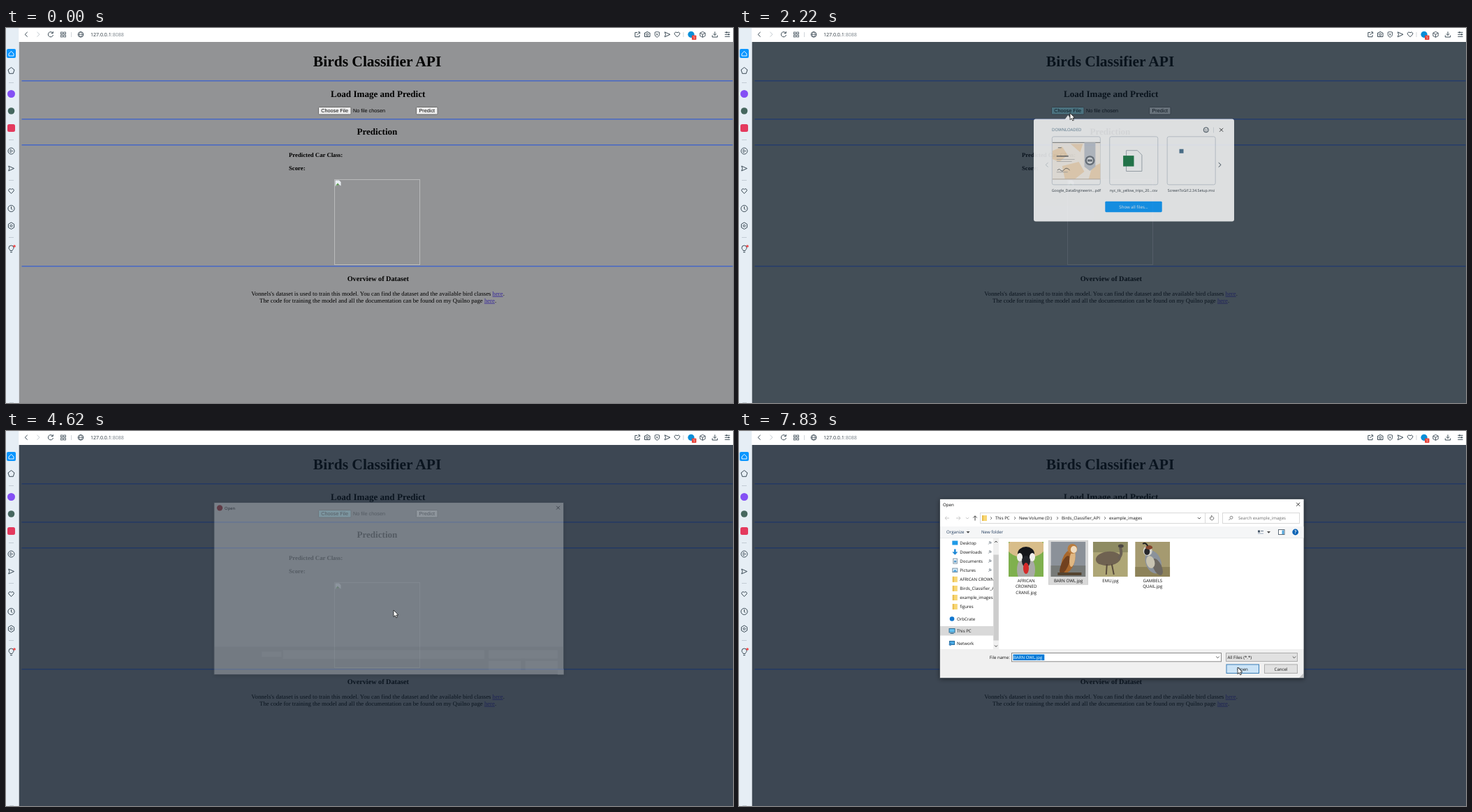
Animation, 1041 px wide and 538 px high, one loop 8000 ms. Source, as an HTML page:

```html
<!DOCTYPE html>
<html lang="en">
<head>
<meta charset="utf-8">
<title>Birds Classifier API</title>
<style>
html, body { margin: 0; width: 100%; height: 100%; overflow: hidden; background: #fff; }
svg { display: block; width: 1041px; height: 538px; }
text { font-family: "Open Sans", "Noto Sans", sans-serif; text-rendering: geometricPrecision; white-space: pre; }
.serif { font-family: "Liberation Serif", "Times New Roman", serif; }
.arial { font-family: "Liberation Sans", Arial, sans-serif; }
.b { font-weight: 700; }
.m { text-anchor: middle; }
.e { text-anchor: end; }
</style>
</head>
<body>
<svg id="stage" viewBox="0 0 1041 538" xmlns="http://www.w3.org/2000/svg"></svg>
<script>
const LOOP = 8000;
const INK = '#3b4a55';

// Drawing helpers
const rect = (x, y, w, h, fill, more = '') =>
  `<rect x="${x}" y="${y}" width="${w}" height="${h}" fill="${fill}" ${more}/>`;
const box = (x, y, w, h, fill, line, more = '') =>
  rect(x + .5, y + .5, w - 1, h - 1, fill, `stroke="${line}" ${more}`);
const disc = (x, y, r, fill, more = '') => `<circle cx="${x}" cy="${y}" r="${r}" fill="${fill}" ${more}/>`;
const ring = (x, y, r, line = INK) => disc(x, y, r, 'none', `stroke="${line}"`);
const oval = (x, y, rx, ry, fill, turn = 0) =>
  `<ellipse rx="${rx}" ry="${ry}" fill="${fill}" transform="translate(${x} ${y}) rotate(${turn})"/>`;
const line = (d, color = INK, more = '') => `<path d="${d}" fill="none" stroke="${color}" ${more}/>`;
const fill = (d, color) => `<path d="${d}" fill="${color}"/>`;
const text = (x, y, s, size, cls = '', color = '#000') =>
  `<text x="${x}" y="${y}" font-size="${size}" class="${cls}" fill="${color}">${s}</text>`;
const group = (id, body, more = '') => `<g id="${id}" ${more}>${body}</g>`;
const at = (x, y, body) => `<g transform="translate(${x} ${y})">${body}</g>`;
const chevron = (x, y, dx, dy, color = INK) =>
  line(dx ? `M${x - dx / 2} ${y - 3.2}l${dx} 3.2l${-dx} 3.2` : `M${x - 2.2} ${y - dy / 2}l2.2 ${dy}l2.2 ${-dy}`, color);

// Icons around the origin
const heart = line('M0 3.5L-3.4 0A2 2 0 0 1 0-2.4A2 2 0 0 1 3.4 0Z');
const plane = line('M-3.8-3.5L4 0L-3.8 3.5L-2.5 0Z');
const cross = line('M-2.5-2.5l5 5m0-5l-5 5', '#222', 'stroke-width=".9"');
const folder = rect(-3.5, -4, 7, 8, '#f8d775') + rect(-3.5, -4, 2, 8, '#e9bd4c');

function browser() {
  const rules = [78, 160, 218, 300].map(y => rect(4, y, 7, .8, '#b9c4cc')).join('');
  const side = rect(0, 0, 18.5, 538, '#e6eef5') + rules +
    rect(1, 30, 13, 13, '#0a96ff', 'rx="2"') + line('M4 37L7.5 33.3L11 37V40H4Z', '#fff', 'stroke-width=".9"') +
    line('M7.5 56.5L12 60L10.3 65.3H4.7L3 60Z') +
    disc(7.5, 94.5, 5.5, '#8450f5') + disc(7.5, 119, 4.8, '#46675f') +
    rect(2, 138, 11, 11, '#e43a5e', 'rx="2.5"') +
    ring(7.5, 176.5, 4.5) + line('M6 174.3L9.6 176.5L6 178.7Z', INK, 'stroke-width=".8"') +
    at(7.5, 201.5, plane) + at(7.5, 234, heart) +
    ring(7.5, 259, 4.6) + line('M7.5 256V259.5L9.3 260.6') +
    line('M7.5 279L11.6 281.4V286.2L7.5 288.6L3.4 286.2V281.4Z') + ring(7.5, 283.8, 1.5) +
    line('M6 319.5C6 318 4 317.5 4 315.5A3.4 3.4 0 0 1 11 315.5C11 317.5 9 318 9 319.5ZM6 321.7H9') +
    disc(12, 313, 1.8, '#ee4b4b') + rect(5, 537, 6, 1, '#c2ccd3');
  const grid = [[78, 6], [82.3, 6], [78, 10.2], [82.3, 10.2]]
    .map(([x, y]) => rect(x + .5, y, 2.7, 2.7, 'none', `stroke="${INK}" stroke-width=".8"`)).join('');
  const bar = rect(18.5, 0, 1023, 20, '#fff') +
    line('M30.7 5.8L27.2 9.2L30.7 12.6') + line('M44.5 5.8L48 9.2L44.5 12.6', '#c3cad0') +
    line('M66.8 7A3.6 3.6 0 1 0 67.5 10M67.3 5V7.6H64.7') + grid +
    rect(93, 6, 1, 7, '#d0d6da') + ring(107, 9.3, 3.8) + line('M103 9.3H111M107 5.5C104.5 8 104.5 10.6 107 13.1C109.5 10.6 109.5 8 107 5.5', INK, 'stroke-width=".7"') +
    text(121, 12, '127.0.0.1<tspan fill="#7b858c">:8088</tspan>', 7.05, '', '#26323a') +
    line('M904 6.4H900.8V12.7H907V10M903.3 10.3L907.3 6.3M905 5.8H907.6V8.4') +
    line('M914.5 7H916.2L917 5.7H919.5L920.2 7H922V12.5H914.5Z') + ring(918.2, 9.6, 1.5) +
    line('M929.2 6L932.3 5.5L935.5 6V9.7C935.5 11.5 934 12.5 932.3 13.2C930.6 12.5 929.2 11.5 929.2 9.7ZM931 8l2.6 2.6m0-2.6l-2.6 2.6', INK, 'stroke-width=".9"') +
    at(947, 9.3, plane) + at(961, 9.3, heart) + rect(969.5, 6, 1, 7, '#d0d6da') +
    disc(981, 9.3, 4.6, '#0a8fd8') + rect(982, 10.5, 6.5, 6.5, '#e8453c', 'rx="1"') + text(985.2, 16, '1', 5.5, 'm', '#fff') +
    line('M997.5 5.3L1001.2 7.2V11.4L997.5 13.3L993.8 11.4V7.2ZM993.8 7.2L997.5 9.2L1001.2 7.2M997.5 9.2V13.3', INK, 'stroke-width=".9"') +
    line('M1015 5.3V10.3M1012.8 8.3L1015 10.5L1017.2 8.3M1011.3 10.5V13H1018.7V10.5') +
    line('M1029.3 6.3H1036.5M1029.3 9.3H1036.5M1029.3 12.3H1036.5') + rect(1031, 5.3, 1.5, 2, INK) + rect(1034, 8.3, 1.5, 2, INK);
  return side + bar;
}

function page() {
  const here = '<tspan fill="#3a2c9a" text-decoration="underline">here</tspan>.';
  return rect(18.5, 20, 1023, 518, '#929395') +
    [75, 130, 167, 341].map(y => rect(22.5, y + .3, 1018, 1.1, '#2c58d8')).join('') +
    text(531.6, 55, 'Birds Classifier API', 21.5, 'serif b m') +
    text(532.7, 99.4, 'Load Image and Predict', 13.09, 'serif b m') +
    box(447, 113, 47.5, 11.5, '#efefef', '#6b6b6b', 'id="choose" rx="1.2"') +
    text(470.6, 121.3, 'Choose File', 7.27, 'arial m') +
    text(497, 121.3, 'No file chosen', 7.27, 'arial') +
    box(587, 113, 31.5, 11.5, '#efefef', '#6b6b6b', 'rx="1.2"') +
    text(602.8, 121.3, 'Predict', 7.27, 'arial m') +
    text(531.4, 153.4, 'Prediction', 13.09, 'serif b m') +
    text(405, 185.2, 'Predicted Car Class:', 8.73, 'serif b') +
    text(405, 203.8, 'Score:', 8.73, 'serif b') +
    box(470, 217, 123, 123, 'none', '#b9babb') +
    fill('M471.5 218.5H477L479.5 221V226.5L476 224L471.5 227Z', '#e8edf2') + fill('M472 226L475 222.5L477 225Z', '#5a9a4a') +
    text(532.8, 363, 'Overview of Dataset', 10.2, 'serif b m') +
    text(532.6, 383.8, `Vonnels's dataset is used to train this model. You can find the dataset and the available bird classes ${here}`, 8.73, 'serif m') +
    text(532.6, 393.7, `The code for training the model and all the documentation can be found on my Quilno page ${here}`, 8.73, 'serif m');
}

function picker() {
  const card = x => box(x, 155, 70.5, 70.5, '#fff', '#cbd2d8', 'rx="2.5"');
  const label = (x, s) => text(x, 235.2, s, 5.35, 'm', '#2a343b');
  const paper = rect(448, 163.5, 69, 54, '#fdf6ec') + rect(448, 163.5, 69, 1.2, '#8e8e8e') +
    fill('M448 176L462 170L470 182L458 192L448 188ZM462 198L486 192L494 206L480 217H466ZM505 200L517 194V217H500ZM474 166H492L488 178Z', '#f9dfbd') +
    rect(448, 216.3, 69, 1.2, '#c9c0b2') +
    fill('M494 164H510V199L502 205L494 199Z', '#c5cad2') + disc(502, 190, 7, '#6d747d') + disc(502, 190, 4.6, '#e4e7ea') + rect(498.5, 188.5, 7, 3, '#6d747d') +
    rect(456, 171, 5, 1, '#777') + rect(454, 183, 17, 1.5, '#666') + rect(454, 188, 26, .7, '#aaa') + rect(454, 191, 22, .7, '#aaa') +
    line('M455 204q3-3 5 0t5-1t8 1', '#444', 'stroke-width=".8"') + rect(454, 206.5, 16, .7, '#999');
  return rect(421, 130, 289, 148, '#fff', 'rx="3"') + fill('M466 130.5L470.5 124.5L475 130.5Z', '#fff') +
    text(447.3, 148, 'DOWNLOADED', 6, '', '#5a7c90') +
    ring(669.5, 145.8, 3.6) + disc(668.2, 145, .6, INK) + disc(670.8, 145, .6, INK) + line('M667.5 146.8q2 1.8 4 0', INK, 'stroke-width=".7"') +
    rect(680, 142, .8, 8, '#d6dce0') + at(691.5, 145.8, cross) +
    card(447) + card(530) + card(613) + paper +
    line('M554.5 175.5H570.5L577 182V205.5H554.5Z', '#9aa5ac', 'stroke-width=".9"') + rect(550, 183, 15.5, 15.5, '#1b7a45') +
    rect(631, 173.5, 6, 6, '#4a7390') +
    chevron(440, 196.3, -3.5, 0, '#ccd2d6') + chevron(689.3, 196.3, 3.5, 0) +
    label(482.3, 'Google_DataEngineerin...pdf') + label(565, 'nyc_tlc_yellow_trips_20...csv') + label(648, 'ScreenToGif.2.34.Setup.msi') +
    rect(524, 249, 82, 15.7, '#0a9bff', 'id="showAll" rx="1.5"') + text(565, 259, 'Show all files...', 6.15, 'm', '#fff');
}

// Four bird thumbnails, each 50 by 50
const birds = [
  rect(0, 0, 50, 50, '#7fb04e') + oval(25, 8, 27, 15, '#d8bd8a') + oval(25, 40, 13, 20, '#a9aaa6') +
    oval(25, 17, 12, 10, '#15161a') + oval(16, 22, 4, 6, '#f1efec') + oval(34, 22, 4, 6, '#f1efec') +
    oval(25, 28, 6, 8, '#22242a') + oval(25, 38, 4, 8, '#d42a2a'),
  rect(0, 0, 50, 50, '#8b9199') + rect(0, 34, 50, 16, '#777a78') + oval(25, 28, 9, 17, '#a8672c', 18) +
    oval(20, 33, 5, 14, '#71411f', 24) + oval(31, 24, 4, 12, '#dfb783', 8) + oval(31, 10, 7, 7, '#b97c3d') + oval(33, 11, 4.5, 5, '#f0dcc0') +
    rect(10, 44, 34, 4, '#54432f'),
  rect(0, 0, 50, 50, '#aea676') + rect(0, 0, 50, 15, '#8e8b62') + oval(22, 24, 18, 10, '#6f6251', -6) +
    line('M36 24Q43 19 39 8', '#6a6055', 'stroke-width="4"') + oval(40, 6, 4, 2.5, '#4c4743') +
    line('M20 32L19 47M27 32L30 47', '#5a4d3e', 'stroke-width="2"'),
  rect(0, 0, 50, 50, '#a59a70') + rect(0, 36, 50, 14, '#8d8259') + oval(26, 29, 11, 17, '#8b929b', -20) +
    oval(32, 36, 6, 13, '#6d6861', -25) + oval(18, 13, 6.5, 7, '#d5d3cb') + oval(17, 14, 4, 5, '#26272b') +
    oval(20, 8, 5, 3, '#85452d') + line('M18 6Q15 0 11 3', '#222', 'stroke-width="2"') + oval(22, 29, 6, 9, '#c8c3b1', -15)
];

function dialogBlank() {
  const white = (x, y, w, h) => rect(x, y, w, h, '#fff');
  return white(358.5, 320.3, 29.5, 8) + white(390.3, 318, 300.5, 13) + white(697, 318, 103, 12.5) +
    white(697, 334, 48, 14) + white(752, 334, 48, 14) + white(800, 346, 9, 8.5);
}

function dialogBody() {
  const small = (x, y, s, cls, color = '#111') => text(x, y + 2.3, s, 6.1, cls, color);
  const crumbs = [[367, 'This PC'], [401, 'New Volume (D:)'], [462, 'Birds_Classifier_API'], [530, 'example_images']];
  const places = ['Desktop', 'Downloads', 'Documents', 'Pictures', 'AFRICAN CROWNED', 'Birds_Classifier_API', 'example_images', 'figures'];
  const placeIcon = [
    rect(-4, -3, 8, 6, '#1f9be8'),
    fill('M-1.2-4H1.2V0H4L0 4.2L-4 0H-1.2Z', '#1b87d6'),
    box(-3, -4, 6.5, 8, '#fff', '#8195a5') + rect(-1.5, -1, 3.5, 3, '#5e9cc9'),
    box(-4, -3.2, 8, 6.5, '#d9efff', '#7c94a5') + fill('M-3 2L0-1L3 2Z', '#3f9bd8')
  ];
  const pin = line('M-1.8 2L0 .2M-.9-1.5L1.6 1M.2-2.4L2.4-.2L.6 .4L-.6-.8Z', '#7c8790', 'stroke-width=".9"');
  const list = places.map((s, i) => {
    const y = 160.5 + i * 13.08;
    return at(309.3, y, placeIcon[i] || folder) + small(316.3, y, s) + (i < 4 ? at(359, y, pin) : '');
  }).join('');
  const names = [['AFRICAN', 'CROWNED', 'CRANE.jpg'], ['BARN OWL.jpg'], ['EMU.jpg'], ['GAMBELS', 'QUAIL.jpg']];
  const files = names.map((rows, i) => {
    const x = 386 + i * 60.4;
    return `<svg x="${x}" y="159" width="50" height="50">${birds[i]}</svg>` +
      rows.map((s, n) => small(x + 25.2, 215 + n * 8.1, s, 'm')).join('');
  }).join('');
  const button = (id, x, y, w, h) => box(x, y, w, h, '#e1e1e1', '#adadad', `id="${id}"`);
  return line('M301 125H295M297.5 122.5L295 125L297.5 127.5M311 125H317M314.5 122.5L317 125L314.5 127.5', '#c8c8c8') +
    chevron(327, 125, 0, 1.8, '#c8c8c8') + line('M338 128.5V121.8M335.3 124.5L338 121.8L340.7 124.5', '#444') +
    box(345, 117, 323, 16, '#fff', '#d9d9d9') + box(667, 117, 20, 16, '#fff', '#d9d9d9') + box(692, 117, 111, 16, '#fff', '#d9d9d9') +
    at(351.5, 125, folder) +
    crumbs.map(([x, s]) => line(`M${x - 7} 123l2 2l-2 2`, '#555', 'stroke-width=".8"') + small(x, 125, s)).join('') +
    chevron(659, 125, 0, 2.2, '#555') + line('M679 123.3A2.6 2.6 0 1 1 676.5 122.6M676 121L678 122.6L676.3 124', '#555', 'stroke-width=".9"') +
    ring(705, 124.2, 2, '#888') + line('M703.5 125.8L701.3 128', '#888') + small(715, 125, 'Search example_images', '', '#6d6d6d') +
    rect(288, 137, 520.5, 16, '#f5f6f7') + rect(288, 153, 520.5, .8, '#e2e4e6') +
    small(297, 145, 'Organize', '', '#1e395b') + fill('M325.5 144H330.5L328 146.8Z', '#444') + small(347, 145, 'New folder', '', '#1e395b') +
    rect(743, 142.5, 3, 3, '#456') + rect(747, 143, 4, 1, '#678') + rect(743, 146.5, 8, 1, '#9ab') + fill('M756 144H761L758.5 146.8Z', '#444') +
    box(772, 141, 9.5, 8, '#fff', '#5d6b78') + rect(777.5, 142.5, 3, 5.5, '#56a8dd') +
    disc(796.7, 145, 4.4, '#0b63b5') + text(796.7, 147.4, '?', 6.5, 'b m', '#fff') +
    `<svg x="288" y="154" width="76" height="159" viewBox="288 154 76 159">` + rect(288, 280, 76, 13.5, '#d9d9d9') + list +
    disc(305, 269.5, 3.3, '#1177cf') + small(312, 269.5, 'OrbCrate') +
    box(300.5, 283, 9, 6.5, '#62c0f0', '#356f95') + rect(302.5, 290, 5, 1, '#356f95') + small(312, 287, 'This PC') +
    box(301, 301, 8, 6, '#4cabe5', '#246a9b') + disc(302.5, 306, 2, '#3d87bf') + small(312, 304.5, 'Network') + '</svg>' +
    rect(364, 154, 8, 159, '#f0f0f0') + rect(364.3, 177.5, 7.5, 123, '#cdcdcd') +
    line('M366 160L368 158L370 160M366 307.5L368 309.5L370 307.5', '#444') +
    group('files', box(443, 156.7, 57, 64, '#cce8ff', '#99d1ff', 'id="pick"') + files) +
    small(387.8, 324.5, 'File name:', 'e') + box(390, 318, 301, 13.3, '#fff', '#0078d7', 'id="field"') +
    rect(392.5, 320.5, 44.8, 8.5, '#0078d7', 'id="marked"') +
    group('fileName', small(393, 324.7, 'BARN OWL.jpg', '', 'currentColor')) + rect(393, 320.3, .8, 8.5, '#000', 'id="caret"') +
    chevron(685.5, 324.6, 0, 2.2, '#555') +
    button('kinds', 697, 318, 103, 13) + small(699.5, 324.5, 'All Files (*.*)') + chevron(795, 324.6, 0, 2.2, '#555') +
    button('open', 697.5, 334.5, 47.5, 13.5) + small(721, 341.2, 'Open', 'm') +
    button('cancel', 752, 334.5, 48, 13.5) + small(776, 341.2, 'Cancel', 'm') +
    fill('M808 348V354H802Z', '#c4c4c4');
}

const dialog = () => rect(287.5, 97.5, 521.5, 257, '#fff', 'filter="url(#shade)"') +
  rect(287.5, 313, 521.5, 41.5, '#f0f0f0') + rect(287.5, 97.5, 521.5, 257, 'none', 'stroke="#39434b" stroke-width=".8"') +
  disc(296, 105.5, 4.3, '#b3202b', 'id="badge"') +
  `<text id="caption" y="107.8" font-size="6.1">Open</text>` + at(800.7, 105.3, cross) +
  group('blank', dialogBlank()) + group('body', dialogBody());

const arrow = `<path d="M0 0V9.6L2.2 7.6L3.8 11L5.4 10.2L3.9 7H6.8Z" fill="#fff" stroke="#111" stroke-width=".75"/>`;

document.getElementById('stage').innerHTML =
  '<defs><filter id="shade" x="-5%" y="-5%" width="110%" height="110%"><feDropShadow dx="0" dy="1.5" stdDeviation="3" flood-opacity=".5"/></filter></defs>' +
  page() + rect(18.5, 20, 1023, 518, '#102030', 'id="veil"') + browser() +
  group('picker', picker()) + group('dialog', dialog()) +
  disc(0, 0, 6.5, '#e2e21a', 'id="click" fill-opacity=".8"') + group('cursor', arrow) +
  group('busy', line('M4 0A4 4 0 1 1 0-4', '#2f8fe0', 'stroke-width="1.3"'));

const $ = id => document.getElementById(id);
const set = (id, attrs) => Object.entries(attrs).forEach(([k, v]) => $(id).setAttribute(k, v));
const show = (id, on) => set(id, { visibility: on ? 'inherit' : 'hidden' });
const within = (t, a, b) => t >= a && t < b;

// Rows of [start, ...values], held until the next row
const held = (rows, t) => rows.reduce((now, row) => t >= row[0] ? row : now);
const veil = [[0, 0], [2150, .49], [2220, .6], [2270, .65]];
const popup = [[0, 0, 1], [2150, .39, .972], [2220, .82, .993], [2270, 1, 1], [3750, .8, .99], [3830, .42, .974], [3880, .1, .96], [3940, 0, 1]];
const opening = [[0, 0, 1], [4620, .3, .96], [4730, .8, .99], [4840, 1, 1]];

// Pointer moves: first change, last change, steps, target x, y
const moves = [
  [70, 400, 6, 938, 423], [600, 1370, 12, 474, 126], [1430, 1570, 3, 474, 122],
  [2530, 2800, 5, 547, 260], [2860, 3000, 3, 550, 262.5], [3060, 3270, 4, 555, 257],
  [4980, 5780, 12, 474, 199], [5850, 6050, 4, 476.5, 195.5],
  [6670, 7430, 12, 715, 340], [7490, 7560, 2, 714, 339]
];
function pointer(t) {
  let x = 1012, y = 552;
  for (const [a, b, n, tx, ty] of moves) {
    if (t < a) break;
    const k = Math.min(n, 1 + Math.floor((t - a) / ((b - a) / (n - 1)) + 1e-6));
    const p = k / n, e = n > 5 ? p * p * (3 - 2 * p) : p;
    x += (tx - x) * e;
    y += (ty - y) * e;
  }
  return [x, y];
}

const zoom = (id, [, alpha, s], cx, cy) => {
  set(id, { opacity: alpha, transform: `translate(${cx} ${cy}) scale(${s}) translate(${-cx} ${-cy})` });
  show(id, alpha > 0);
};

function draw(t) {
  const [x, y] = pointer(t);
  const final = t >= 7830, picked = t >= 6270;
  set('veil', { opacity: held(veil, t)[1] });
  set('choose', { fill: t >= 1430 ? '#a5eef8' : '#efefef' });
  zoom('picker', held(popup, t), 565.5, 204);
  set('showAll', { fill: within(t, 3340, 3400) ? '#0873e0' : t >= 2730 ? '#0a84ff' : '#0a9bff' });

  zoom('dialog', held(opening, t), 548, 226);
  const ready = t >= 4980;
  show('blank', !ready);
  show('body', ready);
  show('files', t >= 5120);
  show('badge', !final);
  set('caption', { x: final ? 292 : 303.3 });
  const hover = t >= 5640;
  show('pick', t >= 5120 && hover && ready);
  set('pick', final ? { fill: '#d9d9d9', stroke: '#d0d0d0' } : picked ? { fill: '#cce8ff', stroke: '#99d1ff' } : { fill: '#e5f3ff', stroke: '#e5f3ff' });
  if (!ready) ['files', 'pick'].forEach(id => show(id, false));
  set('field', { stroke: final ? '#8a8a8a' : '#0078d7' });
  show('fileName', picked);
  set('fileName', { color: final ? '#fff' : '#111' });
  show('marked', final);
  show('caret', ready && !final && (t - 6270 + 5300) % 1060 < 530);
  const over = t >= 7430;
  set('open', { fill: over ? '#cce4f7' : '#e1e1e1', stroke: final ? '#3a7fb8' : '#0078d7', 'stroke-width': over ? 1 : 1.4 });

  set('cursor', { transform: `translate(${x} ${y})` });
  set('click', { cx: x, cy: y + 1 });
  show('click', within(t, 1840, 1980) || within(t, 3340, 3400) || within(t, 6270, 6400) || within(t, 7770, 7830));
  set('busy', { transform: `translate(562.5 257.5) rotate(${Math.floor(t / 65) * 40})` });
  show('busy', within(t, 3540, 4420));
}

const start = performance.now();
function tick() {
  draw((performance.now() - start) % LOOP);
  requestAnimationFrame(tick);
}
tick();
</script>
</body>
</html>
```
